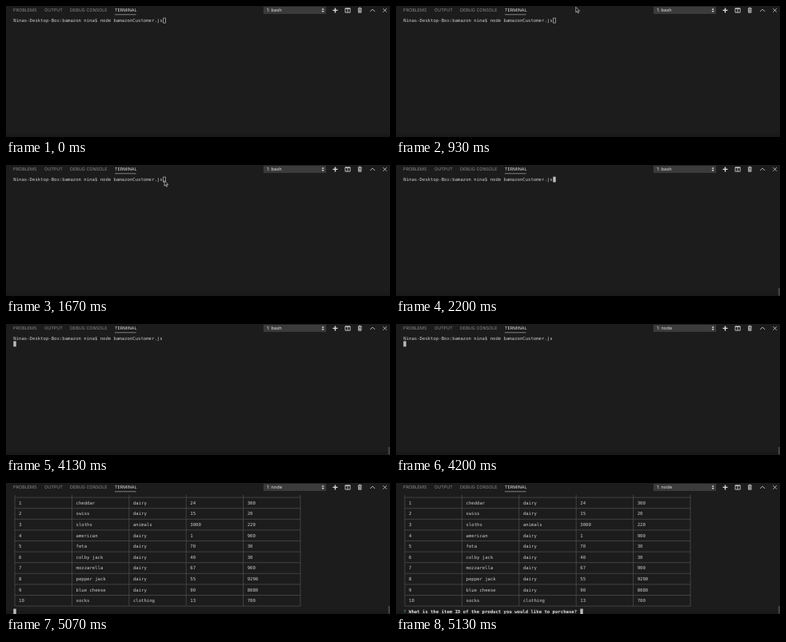
An HTML page for the animation above (8000 ms loop, 480 by 164 pixels).

```html
<!DOCTYPE html>
<html lang="en">
<head>
<meta charset="utf-8">
<title>Terminal session</title>
<style>
html, body { margin: 0; width: 100%; height: 100%; overflow: hidden; background: #1c1c1c; }
svg { display: block; width: 480px; height: 164px; }
text { white-space: pre; text-rendering: geometricPrecision; }
.ui { font: 5.45px Inter, sans-serif; fill: #8b8b8b; }
.ui .on { fill: #e0e0e0; }
#shell { font-size: 5.65px; }
#term { font: 5.648px "DejaVu Sans Mono", monospace; fill: #cacaca; }
.line { fill: none; stroke: #dcdcdc; stroke-width: .8; }
.bold { stroke-width: 1.4; }
</style>
</head>
<body>
<svg viewBox="0 0 480 164">
  <rect width="480" height="164" fill="#1c1c1c"/>
  <rect y="160" width="480" height="4" fill="#1a1919"/>
  <g class="ui">
    <text x="9" y="7.3">PROBLEMS</text>
    <text x="48" y="7.3">OUTPUT</text>
    <text x="80" y="7.3">DEBUG CONSOLE</text>
    <text x="136" y="7.3" class="on">TERMINAL</text>
    <rect x="136" y="10.4" width="26.5" height=".8" fill="#989898"/>
    <rect x="321.8" y=".8" width="78.2" height="9.1" fill="#3b3b3b"/>
    <text id="shell" x="326" y="7.3" class="on"></text>
    <path d="M394.6 4.8l1.5-2 1.5 2zM394.6 6.1l1.5 2 1.5-2z" fill="#e0e0e0"/>
  </g>
  <path class="line bold" d="M408.5 5.4h6M411.5 2.4v6"/>
  <path class="line" d="M424 2.9h6.2v5.2h-6.2zM427.1 2.9v5.2M424 3.3h6.2"/>
  <path class="line" d="M439.8 3.2h5M441.4 2.9v-.7h1.8v.7M440.6 3.4v4.8h3.4v-4.8M441.8 4.4v3.2M442.8 4.4v3.2"/>
  <path class="line" d="M455.2 7l3-3 3 3"/>
  <path class="line" d="M471.4 3.2l4.4 4.4M475.8 3.2l-4.4 4.4"/>
  <rect id="slider" x="477.8" y="154" width="2.2" height="9.5" fill="#424242"/>
  <g id="term">
    <g id="intro"></g>
    <g id="table"></g>
  </g>
  <rect id="caret"/>
  <path id="mouse" d="M0 0V6.6L1.5 5.2L2.6 7.6L3.7 7.1L2.6 4.8H4.7Z" fill="#111" stroke="#eee" stroke-width=".6"/>
</svg>
<script>
const LOOP = 8000, STEP = 1000 / 15;
const LEFT = 9.3, TOP = 14.7, CHAR = 3.4, LINE = 6.8;
const $ = id => document.getElementById(id);
const colX = col => LEFT + col * CHAR;
const rowY = row => TOP + row * LINE;
const show = (el, on) => el.style.display = on ? '' : 'none';

function setAll(el, attrs) {
  for (const key in attrs) el.setAttribute(key, attrs[key]);
}

function make(parent, tag, attrs, text = '') {
  const el = document.createElementNS('http://www.w3.org/2000/svg', tag);
  setAll(el, attrs);
  el.textContent = text;
  return parent.appendChild(el);
}

const print = (parent, col, row, text, attrs = {}) =>
  make(parent, 'text', { x: colX(col), y: rowY(row) + 5.3, ...attrs }, text);

const command = 'Ninas-Desktop-Box:bamazon nina$ node bamazonCustomer.js';
const question = 'What is the item ID of the product you would like to purchase? ';
const items = `cheddar,dairy,24,300
swiss,dairy,15,20
sloths,animals,3000,220
american,dairy,1,900
feta,dairy,70,30
colby jack,dairy,40,30
mozzarella,dairy,67,900
pepper jack,dairy,55,9290
blue cheese,dairy,90,8080
socks,clothing,13,700`.split('\n');

print($('intro'), 0, 0, command);
const connected = print($('intro'), 0, 1, 'connected as id 69');

let grid = '';
for (let i = 0; i <= 5; i++) grid += `M${colX(21 * i + .5)} ${rowY(0)}V${rowY(20.5)}`;
for (let i = 0; i <= 10; i++) grid += `M${colX(.5)} ${rowY(2 * i + .5)}H${colX(105.5)}`;
make($('table'), 'path', { d: grid, fill: 'none', stroke: '#5c5c5c', 'stroke-width': .6 });
items.forEach((item, row) =>
  [row + 1, ...item.split(',')].forEach((cell, col) =>
    print($('table'), 2 + 21 * col, 1 + 2 * row, cell)));

const prompt = make($('term'), 'g', { 'font-weight': 'bold' });
print(prompt, 0, 21, '?', { fill: '#4f8a70' });
print(prompt, 2, 21, question, { fill: '#e0e0e0' });

// Pointer path: time, x, y
const path = [
  [930, 225, 1], [1000, 221, 7], [1070, 216.5, 12], [1133, 212, 16], [1200, 208, 19],
  [1333, 201, 19.3], [1400, 199, 19], [1599, 199, 19], [1667, 198, 19.6],
  [2066, 198, 19.6], [2067, 200, 14], [2133, 203, 4], [2200, 203, -9]
];

function pointerAt(time) {
  const t = Math.floor((time + 3.4) / STEP) * STEP;
  const i = path.findIndex(p => p[0] > t);
  if (i < 1) return null;
  const [t0, x0, y0] = path[i - 1], [t1, x1, y1] = path[i];
  const k = (t - t0) / (t1 - t0);
  return [x0 + (x1 - x0) * k, y0 + (y1 - y0) * k];
}

function placeCaret(col, row, focused) {
  const inset = focused ? 0 : .35;
  setAll($('caret'), {
    x: colX(col) + inset, y: rowY(row) + inset,
    width: CHAR - 2 * inset, height: LINE - 2 * inset,
    fill: focused ? '#bdbdbd' : 'none', stroke: focused ? 'none' : '#bdbdbd', 'stroke-width': .7
  });
}

function draw(t) {
  const focused = t >= 1870, listed = t >= 5070, asked = t >= 5130;
  $('shell').textContent = t < 4200 ? '1: bash' : '1: node';
  show($('slider'), focused);
  show($('intro'), !listed);
  show(connected, t >= 5000);
  show($('table'), listed);
  show(prompt, asked);

  if (t < 4130) placeCaret(command.length, 0, focused);
  else if (t < 5000) placeCaret(0, 1, true);
  else if (!listed) placeCaret(0, 2, true);
  else placeCaret(asked ? question.length + 2 : 0, 21, true);

  const pointer = t < 2197 && pointerAt(t);
  show($('mouse'), pointer);
  if (pointer) $('mouse').setAttribute('transform', `translate(${pointer})`);
}

const start = performance.now();
function tick() {
  draw((performance.now() - start) % LOOP);
  requestAnimationFrame(tick);
}
tick();
</script>
</body>
</html>
```
